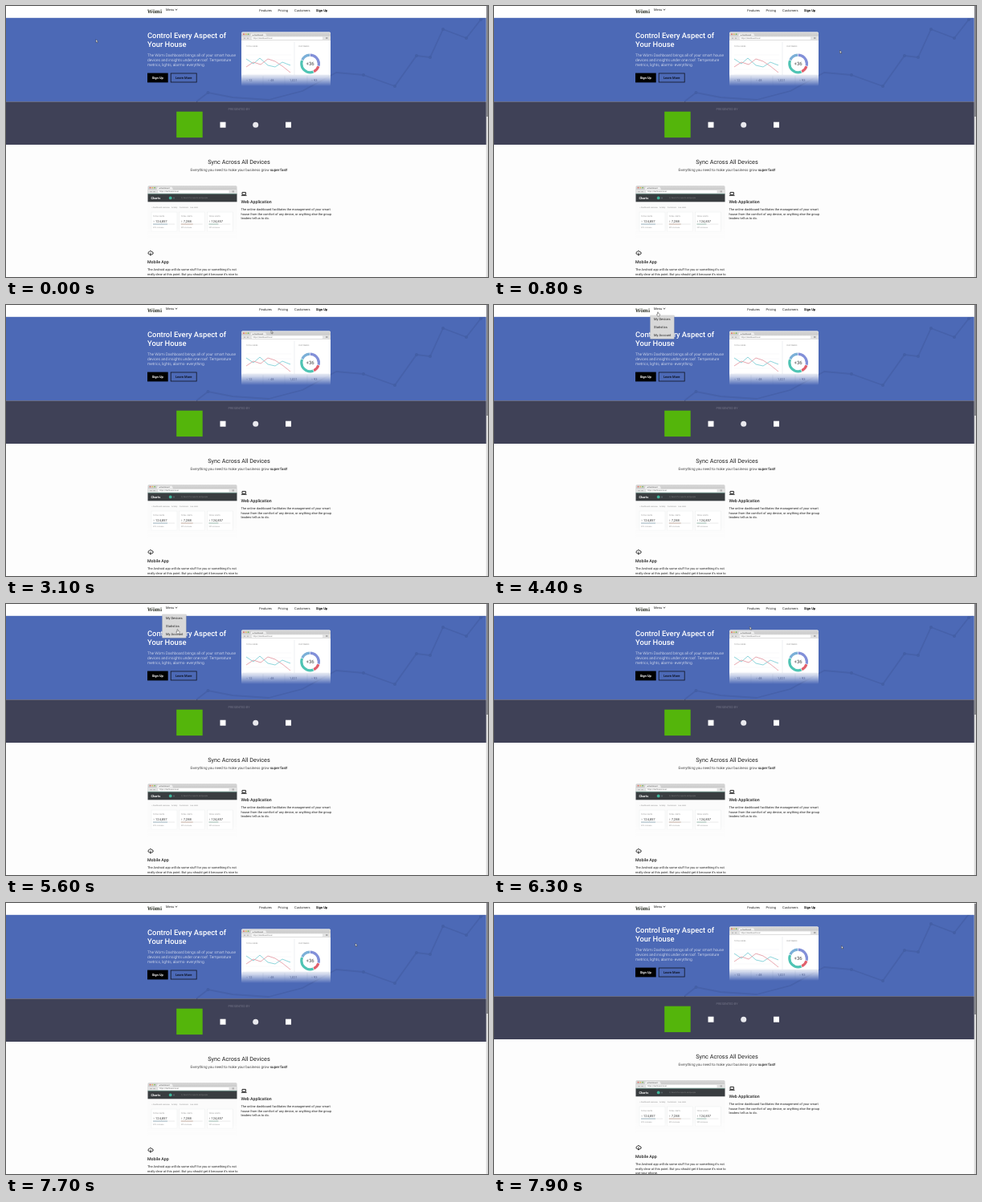
These frames come from a looping animation (600x338 px, 8000 ms). An HTML page:

```html
<!DOCTYPE html>
<html lang="en">
<head>
<meta charset="utf-8">
<title>Dashboard landing page</title>
<style>
  html, body { margin: 0; width: 100%; height: 100%; overflow: hidden; background: #fff; }
  svg { display: block; width: 100vw; height: 100vh; text-rendering: geometricPrecision; }
  text { font-family: Roboto, sans-serif; font-size: 4.06px; fill: #222; white-space: pre; }
  .medium { font-weight: 500; }
  .bold { font-weight: 700; }
  .title { font-size: 9.35px; font-weight: 500; fill: #fff; }
  .lead { font-size: 4.83px; font-weight: 300; fill: #fff; }
  .copy { font-size: 3.95px; fill: #222; }
  .tiny { font-size: 2.3px; fill: #888; }
  .brand { font: 600 6.1px "Noto Serif", serif; fill: #262b20; }
</style>
</head>
<body>
<svg viewBox="0 0 600 338" preserveAspectRatio="none">
  <defs>
    <linearGradient id="fade" x2="0" y2="1">
      <stop offset=".78" stop-color="#fff"/>
      <stop offset="1" stop-color="#fff" stop-opacity="0"/>
    </linearGradient>
    <mask id="heroMask"><rect x="290" y="31" width="118" height="69" fill="url(#fade)"/></mask>
    <mask id="appMask"><rect x="174" y="222" width="116" height="69" fill="url(#fade)"/></mask>
    <linearGradient id="chrome" x2="0" y2="1">
      <stop stop-color="#d9d9d9"/><stop offset="1" stop-color="#bcbcbc"/>
    </linearGradient>
    <g id="browser">
      <path d="M0 10.3V1.5Q0 0 1.5 0H109.5Q111 0 111 1.5V10.3Z" fill="url(#chrome)"/>
      <path d="M11 5L12.3 1.6H30L31.5 5Z" fill="#eee"/>
      <rect y="5" width="111" height="5.3" fill="#e2e2e2"/>
      <rect x="13" y="5.9" width="88" height="3.4" rx=".6" fill="#fff"/>
      <path d="M3 7.6h2m2 0h2M105 6.9h2.5m-2.5 1h2.5" stroke="#888" stroke-width=".6"/>
      <circle cx="3" cy="2.6" r=".9" fill="#e66a60"/>
      <circle cx="5.8" cy="2.6" r=".9" fill="#e5bd52"/>
      <circle cx="8.6" cy="2.6" r=".9" fill="#79b75c"/>
      <text x="14" y="4.2" class="tiny" style="fill:#444">● Dashboard</text>
      <text x="14.5" y="8.4" class="tiny" style="fill:#555">https://dashboard.local</text>
    </g>
  </defs>

  <rect width="600" height="338" fill="#fdfdfd"/>
  <g id="page">
    <rect width="600" height="119.3" fill="#4c69b6"/>
    <path d="M237 119.3L251.5 108L282 114L327 117L369 106L411 83L445 86L484 100L511 62L528 64L544 29L573 40L591 17L600 13"
      fill="none" stroke="#4661aa" stroke-width="1.8" stroke-linejoin="round"/>
    <g id="nodes" fill="#445fa6"></g>
    <rect y="119.3" width="600" height="53.7" fill="#3f4157"/>

    <g id="copy"></g>
    <rect x="176" y="83.6" width="25.7" height="11.8" fill="#000"/>
    <rect x="205.2" y="84" width="32" height="11" fill="none" stroke="#10131f" stroke-width=".8"/>
    <text x="188.8" y="91" text-anchor="middle" class="bold" style="fill:#fff">Sign Up</text>
    <text x="221.2" y="91" text-anchor="middle" class="medium" style="fill:#070a14">Learn More</text>

    <g mask="url(#heroMask)">
      <rect x="293" y="32.6" width="111" height="67.4" rx="1.5" fill="#fff"/>
      <use href="#browser" x="293" y="32.6"/>
      <path d="M359 45V86M294 87H404M320 87V100M347 87V100M375 87V100" stroke="#e3e6ea" stroke-width=".6"/>
      <text x="299" y="50.5" class="tiny">TOTAL USERS</text>
      <text x="364" y="50.5" class="tiny">CUSTOMERS</text>
      <path d="M299 61H355M299 67H355M299 73H355M299 79H355M299 85H355" stroke="#edf0f2" stroke-width=".4"/>
      <g fill="none" stroke-width=".7">
        <path d="M299 66L308 72L316 65L326 74L335 76L344 70L354 74" stroke="#5cc3cc"/>
        <path d="M299 76L308 70L317 73L326 66L335 69L344 75L354 83" stroke="#e08690"/>
      </g>
      <g id="donut" fill="none" stroke-width="3.2"></g>
      <text x="378.6" y="74.2" text-anchor="middle" style="font-size:6px;fill:#444">+36</text>
      <g id="heroStats"></g>
    </g>

    <text x="290" y="130" text-anchor="middle" style="font-size:3.9px;fill:#747689">PRESENTED BY</text>
    <rect x="212.2" y="131.7" width="32.5" height="32.4" fill="#54b50b"/>
    <rect x="266.5" y="144.7" width="7" height="7" fill="#fff"/>
    <circle cx="310.7" cy="148.2" r="3.5" fill="#e9e9ee"/>
    <rect x="348" y="144.7" width="7" height="7" fill="#fff"/>

    <text x="290" y="197.1" text-anchor="middle" style="font-size:7.3px">Sync Across All Devices</text>
    <text x="290" y="205.5" text-anchor="middle" style="font-size:4.55px;fill:#444">Everything you need to make your business grow <tspan class="medium" fill="#222">super fast!</tspan></text>

    <g mask="url(#appMask)">
      <rect x="176.5" y="224" width="111" height="67" rx="1.5" fill="#fbfbfb"/>
      <use href="#browser" x="176.5" y="224"/>
      <rect x="176.5" y="234.3" width="111" height="10" fill="#393d40"/>
      <rect x="176.5" y="233.9" width="111" height=".5" fill="#4a8f7c"/>
      <text x="180.5" y="240.7" class="bold" style="fill:#fff;font-size:3.9px">Charts</text>
      <circle cx="204.7" cy="239.4" r="1.9" fill="#3eb49a"/>
      <circle cx="209" cy="239.4" r="1" fill="#59646a"/>
      <text x="218" y="240.3" class="tiny">Q  Search for reports and people</text>
      <text x="181" y="252.4" class="tiny">⌂ Dashboard overview    Activity    Customers    Live stats</text>
      <g id="cards"></g>
    </g>

    <path d="M294 232.4h4.4v2.9h-4.4zM292.8 236.3h6.8" fill="none" stroke="#111" stroke-width=".9"/>
    <path d="M178.5 309.6H178A1.5 1.5 0 0 1 177.9 306.8A2.2 2.2 0 0 1 181.8 306.8A1.4 1.4 0 0 1 181.8 309.6H181.3M179.9 307.7V311M178.6 309.8L179.9 311.1L181.2 309.8"
      fill="none" stroke="#111" stroke-width=".9"/>
  </g>

  <rect width="600" height="14.8" fill="#fff"/>
  <text x="176" y="8.5" class="brand">Wömi</text>
  <text x="199" y="6.1">Menu</text>
  <path d="M210.7 4L212 5.2L213.3 4" fill="none" stroke="#222" stroke-width=".75"/>
  <text x="315.3" y="7.3">Features</text>
  <text x="338.5" y="7.3">Pricing</text>
  <text x="359" y="7.3">Customers</text>
  <text x="386" y="7.3" class="bold" style="fill:#000">Sign Up</text>

  <g id="menu">
    <rect x="194" y="13.2" width="31" height="30" fill="#000" opacity=".13"/>
    <rect x="194.4" y="12.6" width="30" height="29.8" fill="#d8d8d8"/>
    <text x="199" y="18.7">My Devices</text>
    <text x="199" y="28.9">Statistics</text>
    <text x="199" y="39.1">My Account</text>
  </g>

  <rect x="597.7" width="2.3" height="338" fill="#dcdcdc"/>
  <rect id="thumb" x="598" width="2" height="138" fill="#85858a"/>

  <g id="status">
    <rect y="333" width="65" height="5" fill="#34363a"/>
    <text x="0" y="336.6" style="font-size:2.85px;fill:#ddd">s.com/design/inx-credits-stellar-project/hyzing</text>
  </g>

  <g id="cursor" stroke="#222" stroke-width=".4" stroke-linejoin="round" fill="#fff">
    <path id="arrow" d="M0 -1.3V2.4L.8 1.7L1.4 3L2 2.7L1.4 1.4H2.5Z"/>
    <path id="hand" d="M-.5 -.6Q0 -1.2 .5 -.6V1.1L2.2 1.5Q2.7 1.8 2.5 2.6L2 4.5H-.3L-1.7 2.3Q-1.5 1.6 -.5 2.3Z"/>
  </g>
</svg>
<script>
const LOOP = 8000, STEP = 100;
const el = id => document.getElementById(id);
const fill = (id, items, draw) => { el(id).innerHTML = items.map(draw).join(''); };
const show = (id, on) => el(id).setAttribute('visibility', on ? 'visible' : 'hidden');

const lines = (cls, x, y, leading, rows) => rows.map((row, i) =>
  `<text class="${cls}" x="${x}" y="${y + i * leading}">${row}</text>`).join('');

el('copy').innerHTML =
  lines('title', 176, 40.3, 11, ['Control Every Aspect of', 'Your House']) +
  lines('lead', 176, 62.9, 6.2, [
    'The Wömi Dashboard brings all of your smart house',
    'devices and insights under one roof. Temperature',
    'metrics, lights, alarms- everything.']) +
  lines('copy', 292.5, 255.4, 5.4, [
    'The online dashboard facilitates the management of your smart',
    'house from the comfort of any device, or anything else the group',
    'leaders tell us to do.']) +
  lines('copy', 176, 330.3, 5.5, [
    "The Android app will do some stuff for you or something it's not",
    "really clear at this point. But you should get it because it's nice to",
    'use your phone.']) +
  [[292.5, 245.9, 'Web Application'], [176, 320.9, 'Mobile App']].map(([x, y, label]) =>
    `<text class="medium" x="${x}" y="${y}" style="font-size:5.25px">${label}</text>`).join('');

fill('nodes', [[251.5, 108], [445, 86], [484, 100], [511, 62], [528, 64], [544, 29], [573, 40], [591, 17]],
  ([x, y]) => `<circle cx="${x}" cy="${y}" r="2"/>`);

// Each arc: start and length in percent of the ring, then colour.
fill('donut', [[0, 30, '#8290d8'], [30, 14, '#e0606c'], [44, 38, '#4fc4b4'], [82, 18, '#7cb0d8']],
  ([start, size, color]) => `<circle cx="378.6" cy="72" r="10.8" pathLength="100" stroke="${color}"
    stroke-dasharray="${size - 1} ${101 - size}" stroke-dashoffset="${-start}" transform="rotate(-90 378.6 72)"/>`);

fill('heroStats', ['↑ 12', '↑ 48', '1,021', '↑ 93'], (value, i) =>
  `<text x="${299 + i * 27}" y="94" style="font-size:4px;fill:#667">${value}</text>`);

fill('cards', [['124,857', '#7d9fb0'], ['7,288', '#b89a88'], ['124,857', '#7fab9c']], ([value, color], i) => {
  const x = 181 + i * 34.7;
  return `<rect x="${x}" y="257" width="32" height="24" fill="#fff" stroke="#e6e8e9" stroke-width=".4"/>
    <text class="tiny" x="${x + 2}" y="262.5">TOTAL VISITS</text>
    <text x="${x + 2}" y="269.6" style="font-size:4.1px;fill:#444">↑ ${value}</text>
    <rect x="${x + 2}" y="271.7" width="27" height=".7" fill="#e0e0e0"/>
    <rect x="${x + 2}" y="271.7" width="${18 - i * 3}" height=".7" fill="${color}"/>
    <text class="tiny" x="${x + 2}" y="276.8">32% increase</text>`;
});

// Pointer route: time, x, y
const route = [
  [0, 112, 43], [100, 114, 43], [500, 300, 46], [900, 474, 60], [1400, 477, 84], [1800, 456.5, 79.5],
  [1900, 456.5, 79.5], [2400, 468, 62], [2800, 448, 42], [3100, 330, 33], [3400, 230, 28],
  [3700, 192, 25], [4000, 203, 9], [4400, 204, 9.5], [4700, 207, 6], [5200, 210, 20],
  [5600, 213.5, 32.5], [5900, 232, 35], [6400, 340, 28], [6800, 393, 12], [7000, 412, 26],
  [7300, 437, 40], [7600, 436, 50], [7900, 432.5, 54.5], [8000, 432.5, 54.5]
];

function pointerAt(t) {
  const i = route.findIndex(stop => stop[0] > t);
  const [t0, x0, y0] = route[i - 1], [t1, x1, y1] = route[i];
  const k = (t - t0) / (t1 - t0);
  return [x0 + (x1 - x0) * k, y0 + (y1 - y0) * k];
}

const within = (t, from, to) => t >= from && t < to;

function render(time) {
  const t = Math.floor((time % LOOP) / STEP) * STEP;
  const scroll = t >= 7900 ? 3 : 0;
  const overLink = within(t, 3900, 5900) || within(t, 6700, 6900);
  el('page').setAttribute('transform', `translate(0 ${-scroll})`);
  el('thumb').setAttribute('y', scroll / 3);
  el('cursor').setAttribute('transform', `translate(${pointerAt(t)})`);
  show('menu', within(t, 4000, 5900));
  show('status', within(t, 6800, 7300));
  show('hand', overLink);
  show('arrow', !overLink);
}

const start = performance.now();
function tick() {
  render(performance.now() - start);
  requestAnimationFrame(tick);
}
tick();
</script>
</body>
</html>
```
